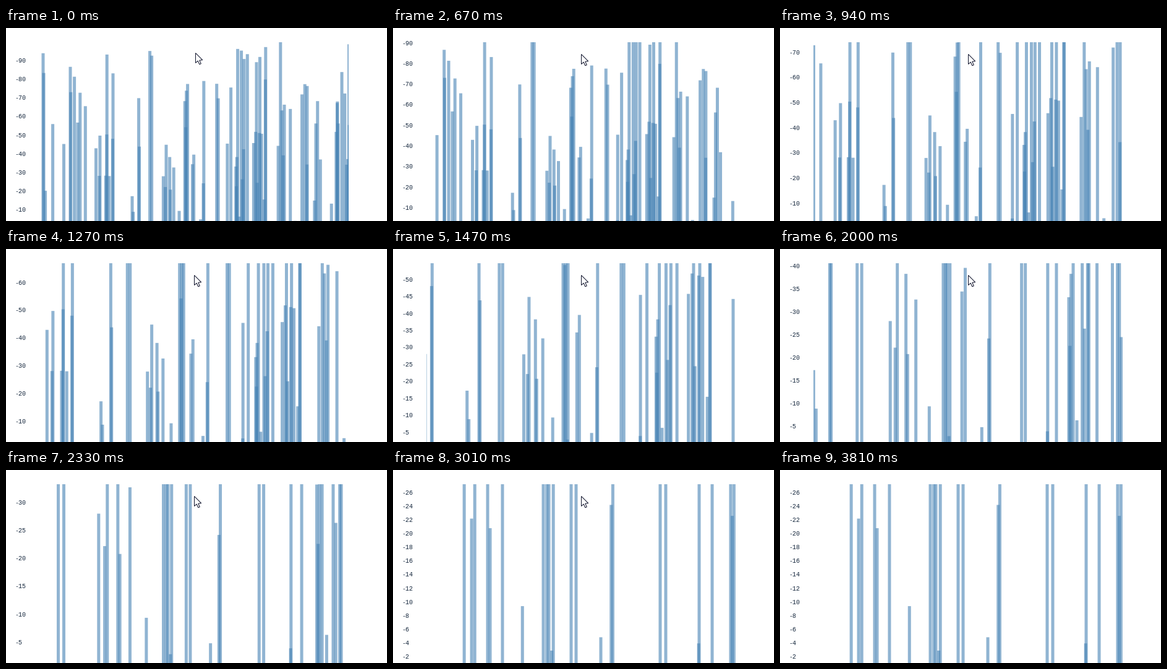
Animation, 616 px wide and 312 px high, one loop 5.15 s. Source, as a matplotlib script:

```python
import numpy as np
import matplotlib.pyplot as plt
from matplotlib.animation import FuncAnimation
from matplotlib.collections import PolyCollection
from matplotlib.patches import Polygon

W, H, DPI = 616, 312, 100
LOOP, STEP = 5150, 10
LEFT, RIGHT, TOP, BASE = 54, 554, 23, 324
Y_MAX = 99.9
BAR = 5
FOCUS = 304          # zoom centre on the x axis

# Bar centres in pixels at zoom 1, and bar values.
CENTRES = np.array([
    60, 61, 63.6, 75.6, 93.5, 104, 104.7, 110.6, 116, 119.8,
    128.3, 145.5, 151.9, 150.9, 163.2, 162.9, 161.3, 166.9, 173, 172.5,
    204, 205.6, 214.6, 215.5, 232.6, 235.6, 254.35, 257.6, 259, 264.67,
    265.76, 271.2, 280, 289.2, 290.75, 291.65, 292.9, 293.6, 301.46, 303.64,
    314.54, 319.1, 319.83, 340.7, 343.15, 357.65, 357.87, 363.6, 371.75,
    372.45, 373.2, 374.6, 377.05, 380.55, 381.97, 384.1, 384.9, 390.25,
    400.4, 403.7, 405, 406.2, 409.6, 410.5, 413.1, 417.2, 419.4, 419.8,
    440.1, 443.8, 446.1, 448.2, 450, 459.7, 467.4, 478.5, 483.2, 486.9,
    486.6, 498.8, 501, 503.7, 508.3, 526.2, 533.8, 535.8, 535.5, 537,
    543, 547.8, 550.8, 552.6, 554.5, 554.8])
VALUES = np.array([
    94, 83.4, 20.2, 56, 45.3, 86.7, 73.1, 81.4, 56.8, 72.8,
    65.6, 43, 49.8, 28.2, 93.3, 50.4, 28.3, 28.1, 83.2, 48.1,
    17.3, 8.9, 69.9, 43.9, 95.2, 92.7, 28, 22.2, 44.9, 38.3,
    20.8, 32.7, 9.4, 68.3, 54.3, 73.9, 2.9, 77.5, 34.45, 39.6,
    4.85, 24.2, 79.1, 77.6, 69.8, 3.95, 45.5, 75.6, 33.2,
    22.6, 38.3, 96.3, 6.35, 95.4, 26.35, 42.5, 90.9, 93.5,
    45.8, 51.8, 89.2, 24.5, 51.2, 92, 50.8, 15.5, 79.9, 97.3,
    44.3, 99.9, 63.3, 39.2, 66.4, 64.1, 4.05, 71.9, 77.4, 76.4,
    34.3, 14.95, 56.3, 68.3, 37, 13.3, 51.8, 68.1, 67.3, 56.3,
    83.9, 72.4, 34.2, 37.2, 98.8, 55.5])

# Each wheel notch zooms by exp(0.1).
NOTCHES = [670, 800, 940, 1270, 1400, 1470, 1800,
           1930, 2000, 2130, 2330, 2480, 3010]
# Time, tip x, tip y.
POINTER = [(0, 306.5, 40.5), (330, 305.5, 41.5), (400, 304.5, 42.5),
           (3740, 304.5, 39.5)]
POINTER_GONE = 3810
ARROW = np.array([(0, 0), (0, 16), (3.7, 12.6), (6.3, 18.3), (8.8, 17.2),
                  (6.3, 11.7), (11.2, 11.2)])

fig = plt.figure(figsize=(W / DPI, H / DPI), dpi=DPI, facecolor="white")
ax = fig.add_axes([0, 0, 1, 1])
ax.set_xlim(0, W)
ax.set_ylim(H, 0)
ax.axis("off")

bars = PolyCollection([], facecolors="steelblue", edgecolors="none",
                      linewidths=0, alpha=0.6)
bars.set_snap(False)
ax.add_collection(bars, autolim=False)

labels = [ax.text(14, 0, "", family="Liberation Mono", size=10 * 72 / DPI,
                  color="#14263c", va="baseline", ha="left")
          for _ in range(16)]
pointer = Polygon(ARROW, closed=True, facecolor="white", edgecolor="#10142c",
                  linewidth=0.72, joinstyle="miter", zorder=5)
ax.add_patch(pointer)


def tick_step(span, count=10):
    step = 10 ** np.floor(np.log10(span / count))
    err = count / span * step
    for limit, factor in ((0.15, 10), (0.35, 5), (0.75, 2)):
        if err <= limit:
            return step * factor
    return step


def bar_shapes(zoom):
    x = FOCUS + zoom * (CENTRES - BAR / 2 - FOCUS)
    x0 = np.clip(x, LEFT, RIGHT)
    x1 = np.clip(x + BAR, LEFT, RIGHT)
    y = np.maximum(BASE - VALUES * zoom * (BASE - TOP) / Y_MAX, TOP)
    return [[(a, BASE), (a, t), (b, t), (b, BASE)]
            for a, b, t in zip(x0, x1, y) if b > a]


def draw_axis(zoom):
    top = Y_MAX / zoom
    step = tick_step(top)
    for i, label in enumerate(labels, 1):
        value = i * step
        label.set_visible(bool(value <= top))
        label.set_text(f"-{value:.0f}")
        label.set_y(BASE - value / top * (BASE - TOP) + 3.2)


def draw_pointer(t):
    _, x, y = [p for p in POINTER if p[0] <= t][-1]
    pointer.set_xy(ARROW + (x, y))
    pointer.set_visible(t < POINTER_GONE)


def update(frame):
    t = frame * STEP
    zoom = np.exp(0.1 * sum(t >= n for n in NOTCHES))
    bars.set_verts(bar_shapes(zoom))
    draw_axis(zoom)
    draw_pointer(t)
    return [bars, pointer, *labels]


anim = FuncAnimation(fig, update, frames=LOOP // STEP, interval=STEP,
                     init_func=lambda: update(0), repeat=True,
                     repeat_delay=0, blit=False)
plt.show()
```
